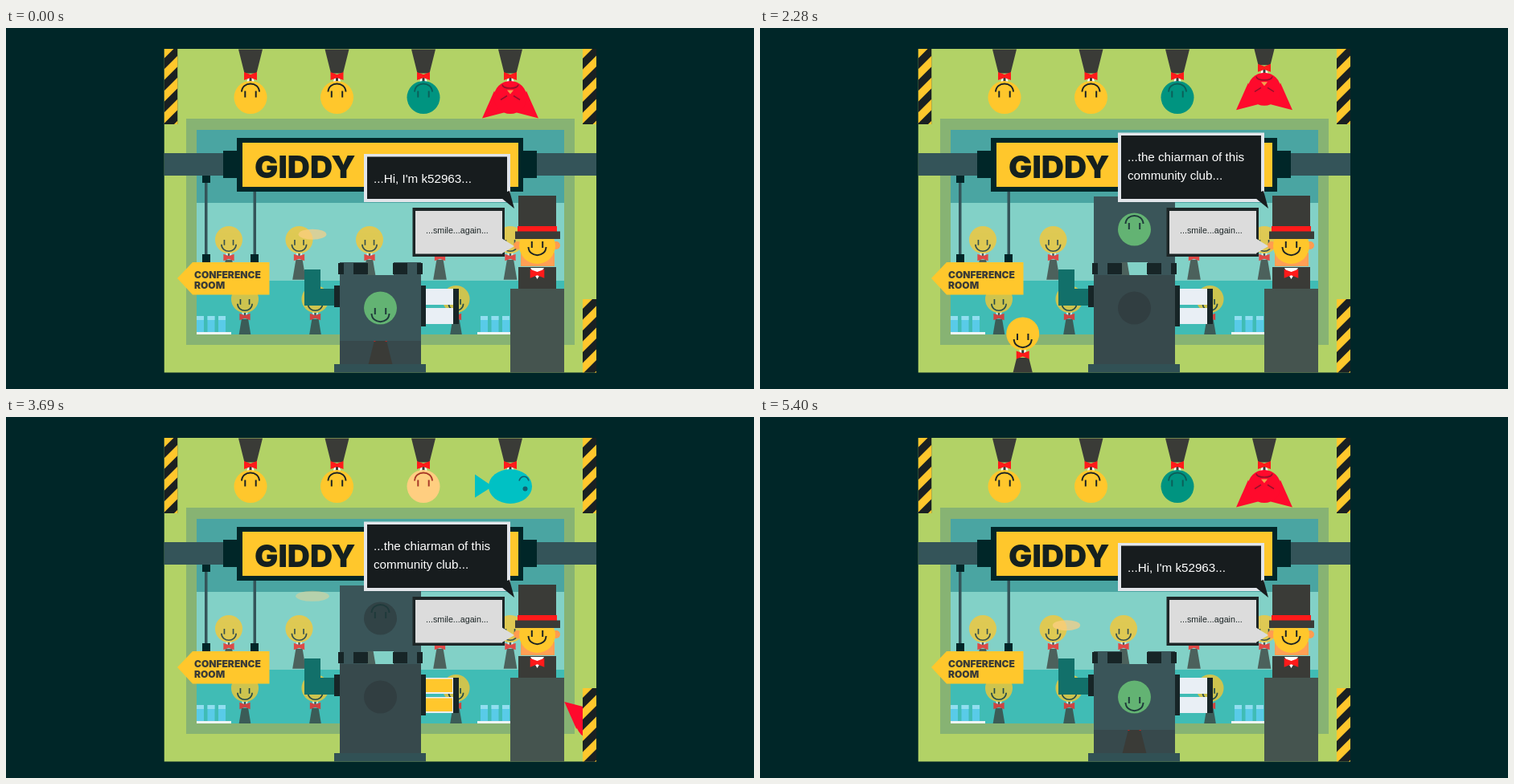
Recreate the animation shown at these times as an HTML page. Size 930 by 450 pixels, loop 5430 ms.

```html
<!DOCTYPE html>
<html lang="en">
<head>
<meta charset="utf-8">
<title>Giddy Atelier</title>
<style>
  html, body { margin: 0; width: 100%; height: 100%; overflow: hidden; background: #002628; }
  svg { display: block; width: 930px; height: 450px; }
  .sign { font-family: Inter, "Open Sans", sans-serif; font-weight: 900; }
  .talk { font-family: "Liberation Sans", Arial, sans-serif; }
</style>
</head>
<body>
<svg id="stage" viewBox="0 0 930 450" xmlns="http://www.w3.org/2000/svg"></svg>
<script>
const LOOP = 5430;
const INK = '#002628', SUIT = '#3a3b37', GOLD = '#ffc72c', STEEL = '#345459', DARK = '#172527', RED = '#ff1a1a';

const rect = (x1, y1, x2, y2, fill, more = '') =>
  `<rect x="${x1}" y="${y1}" width="${x2 - x1}" height="${y2 - y1}" fill="${fill}" ${more}/>`;
const poly = (points, fill) => `<polygon points="${points}" fill="${fill}"/>`;
const disc = (x, y, r, fill) => `<circle cx="${x}" cy="${y}" r="${r}" fill="${fill}"/>`;
const line = (d, color, w = 2) => `<path d="${d}" fill="none" stroke="${color}" stroke-width="${w}"/>`;
const group = (id, inner, more = '') => `<g id="${id}" ${more}>${inner}</g>`;
const text = (x, y, size, fill, str, kind) =>
  `<text class="${kind}" x="${x}" y="${y}" font-size="${size}" fill="${fill}">${str}</text>`;
const place = (x, y, inner, s = 1, flip = 1) =>
  `<g transform="translate(${x} ${y}) scale(${s} ${s * flip})">${inner}</g>`;
const mirror = inner => inner + `<g transform="scale(-1 1)">${inner}</g>`;

// Figures are drawn upright around the centre of the head.
const smile = color => line('M-6.7 0V8M6.7 0V8', color, 2) + line('M-11 7C-10.5 20.5 10.5 20.5 11 7', color);
const bow = poly('-8,21.5 0,24.5 8,21.5 8,31.5 0,28.5 -8,31.5', RED);
const torso = hem => poly(`${-hem / 2},30 ${hem / 2},30 ${hem},60 ${-hem},60`, SUIT) +
  poly('-5,18 5,18 3,25 -3,25', '#fff') + poly('-1.5,18 1.5,18 1.5,25 -1.5,25', SUIT) + bow;

const round = (fill, ink) => disc(0, 0, 20.5, fill) + smile(ink);
const heads = {
  gold: round(GOLD, '#1d2424'),
  green: round('#009480', '#0b5f59'),
  peach: round('#ffce80', '#a83a28'),
  devil: mirror(poly('-35,-26 -8,-19 -20,8', '#ff0a2c')) + disc(0, 0, 20.5, '#ff0a2c') +
    mirror(line('M-12 -3L-4 2', '#98102a', 1.5)) +
    poly('-4,9 0,4 4,9', '#f3a04e') + line('M-10 16C-9 10 9 10 10 16', '#98102a', 1.7),
  fish: poly('-44,-14 -22,0 -44,15', '#00c1c4') +
    '<ellipse rx="27" ry="21.5" fill="#00c1c4"/>' +
    disc(18.5, -3, 3, '#126071') + line('M11 7C13 14 21 14 23 7', '#126071', 1.6)
};
const person = (type, hem = 15) => torso(hem) + heads[type];

function hazard(x, top, bottom) {
  const period = 27, band = period / 2;
  let bands = '';
  for (let y = top - 1.5; y < bottom + 17; y += period)
    bands += poly(`${x},${y} ${x + 17},${y - 17} ${x + 17},${y - 17 + band} ${x},${y + band}`, GOLD);
  return `<svg x="${x}" y="${top}" width="17" height="${bottom - top}" viewBox="${x} ${top} 17 ${bottom - top}">` +
    rect(x, top, x + 17, bottom, '#1a2022') + bands + '</svg>';
}

function glasses(x, tray) {
  let out = rect(tray, 379, tray + 43, 382, '#eef4f6');
  for (let i = 0; i < 3; i++) {
    const g = x + i * 13.5;
    out += rect(g, 359, g + 9, 379, '#59cbe8') + rect(g, 359, g + 9, 364, '#91deef');
  }
  return out;
}

function crowd(count, y, name) {
  let out = '';
  for (let i = 0; i < count; i++) {
    const x = (y < 300 ? 277 : 297) + i * 87.5;
    out += group(name + i, place(x, y, person('gold', 10), .83), 'opacity=".74"');
  }
  return out;
}

const room = () =>
  rect(196.5, 26, 734, 430, '#b2d266') +
  rect(224, 113, 707, 395, '#87b373') +
  rect(237, 127, 694, 218, '#4aa5a2') +
  rect(237, 218, 694, 315, '#82d1c7') +
  rect(237, 315, 694, 382, '#40bcb5') +
  `<g clip-path="url(#pane)">${crowd(5, 264, 'back')}${crowd(4, 338, 'front')}</g>` +
  glasses(237, 237) + glasses(590, 586);

function ceiling() {
  const hang = (id, x, type) => group(id, place(x, 86.5, person(type), 1, -1));
  return hang('h0', 304, 'gold') + hang('h1', 411.5, 'gold') +
    hang('green', 519, 'green') + hang('peach', 519, 'peach') +
    hang('devil', 627, 'devil') + hang('fish', 627, 'fish');
}

const signs = () =>
  rect(196.5, 156, 734, 184, STEEL) +
  rect(270, 153, 288, 187, INK) + rect(643, 153, 660, 187, INK) +
  rect(247, 193, 250.5, 283, STEEL) + rect(307.5, 204, 311, 283, STEEL) +
  rect(244, 184, 254, 193, INK) +
  rect(287, 137, 643, 204, INK) + rect(294, 143, 637, 198, GOLD) +
  text(309, 187, 39, '#14201f', 'GIDDY', 'sign') + text(447, 187, 39, '#14201f', 'ATELIER', 'sign') +
  poly('213,312 232,292 327.5,292 327.5,332.5 232,332.5', GOLD) +
  rect(244, 282, 254, 292, INK) + rect(304, 282, 314, 292, INK) +
  text(234, 311.5, 12, SUIT, 'CONFERENCE', 'sign') + text(234, 324.5, 12, SUIT, 'ROOM', 'sign');

function machine() {
  const bar = (id, y) => rect(522, y, 556, y + 20, '#e9eff5') + rect(522, y + 1.5, 522, y + 18, GOLD, `id="${id}"`);
  const hinge = rect(415, 292, 449, 308, '#3a5559') + rect(413, 293, 420, 307, DARK) + rect(432, 293, 450, 307, DARK);
  const lid = rect(415, 8, 516, 90, '#3a5559') + disc(465.5, 49, 20.5, '#314346') +
    '<circle id="lamp" cx="465.5" cy="49" r="20.5" fill="#68bd78"/>' +
    place(465.5, 49, smile('#1f3a3b'));
  return poly('371,301 391,301 391,325 410,325 410,346 371,346', '#12706a') +
    rect(408, 321, 415, 348, DARK) + rect(516, 321, 522, 372, DARK) +
    bar('bar0', 325) + bar('bar1', 349) + rect(556, 325, 563, 369, DARK) +
    rect(415, 308, 516, 419, '#37494c') + disc(465.5, 349, 20.5, '#313e41') +
    group('actor', group('asGold', person('gold')) + group('asDevil', person('devil'))) +
    group('lid', lid) + place(465.5, 0, mirror(`<g transform="translate(-465.5 0)">${hinge}</g>`)) +
    rect(408, 419, 522, 430, '#315155');
}

const host = () =>
  rect(640, 280, 682, 297, '#ff9f55') +
  disc(636, 271, 5, '#ff9c4f') + disc(684, 271, 5, '#ff9c4f') +
  disc(660.5, 271.5, 22.5, GOLD) + place(660.5, 266, smile('#1d2424')) +
  rect(637, 209, 684, 254, SUIT) + rect(636, 247, 685, 254, RED) + rect(633, 253.5, 689, 263, SUIT) +
  rect(637, 298, 684, 325, SUIT) +
  poly('652,299 669,299 660.5,313', '#fff') + place(660.5, 277, bow, 1.1) +
  rect(627, 325, 694, 430, '#45544f');

function bubbles() {
  const big = (id, top, lines) => group(id,
    rect(445, top, 627, 217, '#e2e5ea') + rect(449, top + 3.5, 623, 213, '#171c1e') +
    poly('611,208 626,203 632,225', '#171c1e') +
    lines.map((s, i) => text(457, top + 35.5 + i * 23, 15.2, '#fff', s, 'talk')).join(''));
  return rect(505.5, 224, 620, 285, '#1d2627') + rect(509, 228, 617, 281.5, '#dcdcdc') +
    poly('616,262 632,272 616,281.5', '#dcdcdc') +
    text(522, 255.5, 10.7, '#1d2627', '...smile...again...', 'talk') +
    big('hello', 157, ["...Hi, I'm k52963..."]) +
    big('title', 130.5, ['...the chiarman of this', 'community club...']);
}

document.getElementById('stage').innerHTML =
  '<defs><clipPath id="scene"><rect x="196.5" y="26" width="537.5" height="403.5"/></clipPath>' +
  '<clipPath id="pane"><rect x="237" y="127" width="457" height="255"/></clipPath></defs>' +
  rect(0, 0, 930, 450, INK) +
  '<g clip-path="url(#scene)">' + room() + ceiling() +
  '<ellipse id="puff" cx="381" ry="6.5" fill="#ffd085"/>' +
  signs() + machine() + host() +
  hazard(196.5, 26, 120) + hazard(717, 26, 120) + hazard(717, 338, 430) + bubbles() + '</g>';

const set = (id, attr, value) => document.getElementById(id).setAttribute(attr, value);
const ramp = (t, start, length) => Math.min(1, Math.max(0, (t - start) / length));
// Rises to 1 from time a, falls back to 0 from time b.
const during = (t, a, b, fade) => ramp(t, a, fade) - ramp(t, b, fade);

// Guests walk in from the right and out to the left at one speed.
function walk(t) {
  const speed = .322, arriving = t > 3100, evil = arriving && t < 5050;
  const x = 465.5 + speed * (arriving ? Math.max(0, 4510 - t) : Math.min(0, 1850 - t));
  set('actor', 'transform', `translate(${x} ${359.5 + 21.5 * during(t, 1720, 4500, 130)})`);
  set('asDevil', 'visibility', evil ? 'visible' : 'hidden');
  set('asGold', 'visibility', evil ? 'hidden' : 'visible');
}

// Steam slows and thins as it climbs.
function steam(t) {
  const start = t >= 2680 && t < 5050 ? 2680 : 5050;
  const age = (t - start + LOOP) % LOOP;
  const rest = Math.exp(-age / 663);
  set('puff', 'cy', 202 + 98 * rest);
  set('puff', 'rx', 23 - 10 * rest);
  set('puff', 'opacity', (.25 + .75 * rest) * (1 - ramp(age, 1750, 300)));
}

function draw(t) {
  set('hello', 'opacity', 1 - during(t, 350, 4750, 380));
  set('title', 'opacity', during(t, 720, 4250, 340));
  set('lamp', 'opacity', .92 * (1 - during(t, 2300, 4980, 400)));
  set('lid', 'transform', `translate(0 300) scale(1 ${Math.cos(Math.PI * during(t, 1100, 4650, 400))})`);
  set('back0', 'opacity', .74 * (1 - during(t, 2350, 3100, 250)));
  for (const id of ['bar0', 'bar1']) set(id, 'width', 33 * during(t, 2700, 4450, 900));

  const lift = (id, amount) => set(id, 'transform', `translate(0 ${-115 * amount})`);
  lift('devil', during(t, 2250, 4900, 350));
  lift('green', during(t, 2900, 4900, 350));
  lift('fish', 1 - during(t, 3000, 4550, 350));
  lift('peach', 1 - during(t, 3150, 4550, 350));
  walk(t);
  steam(t);
}

function tick() {
  draw(performance.now() % LOOP);
  requestAnimationFrame(tick);
}
tick();
</script>
</body>
</html>
```
